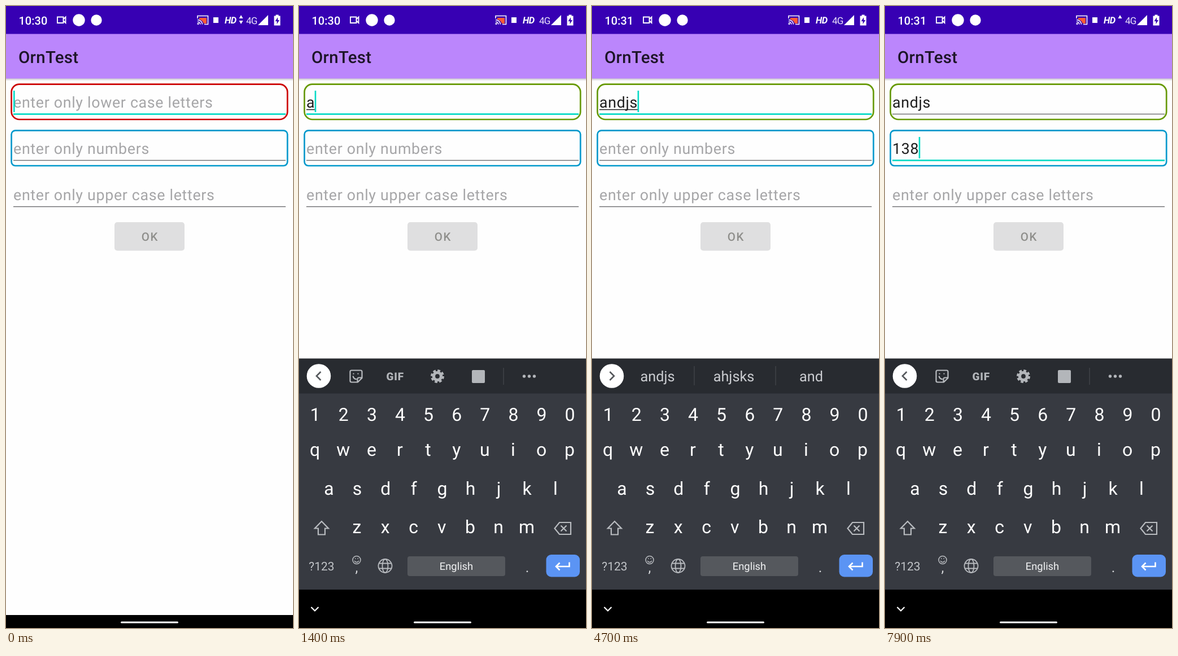
An HTML page that plays this animation: 508x1102 px, repeating every 8000 ms.

```html
<!DOCTYPE html>
<html lang="en">
<head>
<meta charset="utf-8">
<style>
  html, body { margin: 0; width: 100%; height: 100%; overflow: hidden; background: #000; }
  svg { display: block; width: 100%; height: 100%; }
  text { font-family: Roboto, sans-serif; text-rendering: geometricPrecision; white-space: pre; }
  .mid { text-anchor: middle; }
  .input { font-size: 26.8px; letter-spacing: .67px; fill: #1f1f1f; }
  .hint { fill: #a6a6a8; }
  .line { fill: none; stroke-width: 2.2; }
  .grey { stroke: #b9bcc0; fill: none; stroke-width: 2.2; }
  .fill { fill: #b3b6ba; }
  .key { font-size: 32px; fill: #fff; text-anchor: middle; }
  .tip { font-size: 25.3px; fill: #cbcdd1; text-anchor: middle; }
  .rule { stroke: #43464c; stroke-width: 1.3; }
</style>
</head>
<body>
<svg viewBox="0 0 508 1102">
  <defs>
    <linearGradient id="shade" x2="0" y2="1">
      <stop stop-color="#c4c2c8"/><stop offset="1" stop-color="#fefefe"/>
    </linearGradient>
  </defs>
  <rect width="508" height="1102" fill="#fefefe"/>
  <rect y="128" width="508" height="5" fill="url(#shade)"/>
  <rect y="49" width="508" height="79.500" fill="#bb86fc"/>
  <rect width="508" height="49.500" fill="#3700b3"/>

  <!-- status bar -->
  <g fill="#fff">
    <text id="clock" x="22.500" y="32.500" font-size="20" font-weight="500"></text>
    <path d="M91 19.500h10.500v10.500h-10.500zM101.500 23.500l4-4v10.500l-4-4" fill="none" stroke="#fff" stroke-width="1.900"/>
    <circle cx="129" cy="25" r="10.700"/>
    <circle cx="160" cy="25" r="9.700"/>
    <g id="radio">
      <path d="M342 21h13v10h-5q-2-6-8-7z" fill="#ff5a36"/>
      <path d="M339 22v-4.500h18.500v15h-6.500M339 24.500q7.500.5 8.500 8M339 28q4.500.5 5 4.500" fill="none" stroke="#fff" stroke-width="1.600"/>
      <circle cx="340" cy="31.500" r="1.500"/>
      <rect x="367" y="20" width="9" height="10"/>
      <text x="387" y="31" font-size="16.500" font-weight="700" font-style="italic" letter-spacing="-.6">HD</text>
    </g>
    <path id="up" d="M412.500 22l3.500-6 3.500 6z"/>
    <path id="down" d="M412.500 26l3.500 6 3.500-6z"/>
    <text x="425" y="31.500" font-size="17" letter-spacing="-.8" fill="#e9e0fa">4G</text>
    <path d="M464 16v18h-18z"/>
    <path d="M477.500 15.500h5v2h3v17h-11v-17h3z"/>
    <path d="M481 20l-4.500 7h3v5l4.500-7h-3z" fill="#3700b3"/>
  </g>
  <text x="22" y="100.500" font-size="29.500" font-weight="500" letter-spacing=".25" fill="#1d1528">OrnTest</text>

  <!-- form -->
  <g id="form"></g>
  <rect x="192" y="383" width="124" height="50.500" rx="5" fill="#dfdfe0"/>
  <text class="mid" x="255" y="416" font-size="20.500" font-weight="500" letter-spacing="1.800" fill="#8f8f8c">OK</text>
  <rect y="1079" width="508" height="23" fill="#000"/>

  <!-- keyboard -->
  <g id="board">
    <rect y="624.500" width="508" height="63" fill="#282b30"/>
    <rect y="686.500" width="508" height="348" fill="#373a41"/>
    <rect y="1034" width="508" height="180" fill="#000"/>
    <circle cx="35" cy="655.500" r="21.300" fill="#fff"/>
    <path id="arrow" fill="none" stroke="#55585c" stroke-width="2.600"/>
    <g id="tools">
      <path class="grey" d="M93 645.500h16q2.500 0 2.500 2.500v11l-7.500 7.500h-11q-2.500 0-2.500-2.500v-16q0-2.500 2.500-2.500zM111 658.500h-5q-2.500 0-2.500 2.500v5M95.500 655.500q1.500 6 6.500 5.500"/>
      <path class="grey" d="M95.500 651.500h2M103.500 651.500h2"/>
      <text class="fill" x="154.500" y="662.500" font-size="19" font-weight="900" letter-spacing=".8">GIF</text>
      <g fill="none" stroke="#b3b6ba" transform="translate(245 656)">
        <circle r="6.600" stroke-width="5.400"/>
        <circle r="10" stroke-width="4" stroke-dasharray="4.600 3.254"/>
      </g>
      <rect class="fill" x="306" y="645" width="23" height="23" rx="2"/>
      <path class="rule" d="M362 641v30"/>
      <g class="fill"><circle cx="398.500" cy="656" r="2.700"/><circle cx="407.500" cy="656" r="2.700"/><circle cx="416.500" cy="656" r="2.700"/></g>
    </g>
    <g id="tips"><path class="rule" d="M181 638v34M325 638v34"/></g>
    <g id="keys"></g>
    <path class="grey" d="M40 913l12 12.500h-6v11h-12v-11h-6z"/>
    <path class="grey" d="M461 915h20v21h-20l-8.500-10.500zM463.500 920.500l10 10M473.500 920.500l-10 10"/>
    <text class="mid" x="40" y="999.500" font-size="21" fill="#c1c4c8">?123</text>
    <g class="grey" style="stroke-width:1.500">
      <circle cx="102" cy="981.500" r="7"/>
      <path d="M98 983q4 5 8 0M99 979h1.500M103.500 979h1.500"/>
    </g>
    <text class="mid" x="102" y="1003" font-size="25" fill="#d5d7da">,</text>
    <g class="grey" style="stroke-width:1.800">
      <circle cx="152.500" cy="992" r="12"/><ellipse cx="152.500" cy="992" rx="5" ry="12"/>
      <path d="M142 987.500h21M142 996.500h21"/>
    </g>
    <rect x="192" y="975" width="173" height="35" rx="4" fill="#55585d"/>
    <text class="mid" x="278.500" y="999" font-size="18.400" fill="#f2f3f4">English</text>
    <text class="mid" x="404" y="1003" font-size="25" fill="#d5d7da">.</text>
    <rect x="437.500" y="972" width="59.500" height="39.500" rx="9" fill="#5b94f4"/>
    <path class="line" d="M478.500 985.500v7.500h-23M461.500 986.500l-6.500 6.500 6.500 6.500" stroke="#fff" style="stroke-width:2.600"/>
    <path class="line" d="M21.500 1065l6.500 6.500 6.500-6.500" stroke="#fff"/>
  </g>
  <path d="M204.500 1092h99" stroke="#fff" stroke-width="3" stroke-linecap="round"/>
</svg>
<script>
const LOOP = 8000, STEP = 100, LEFT = 13;
const $ = id => document.getElementById(id);

function add(parent, tag, attrs, text = '') {
  const el = document.createElementNS('http://www.w3.org/2000/svg', tag);
  for (const k in attrs) el.setAttribute(k, attrs[k]);
  el.textContent = text;
  return parent.appendChild(el);
}
const show = (el, on) => el.setAttribute('visibility', on ? 'inherit' : 'hidden');
// Latest entry whose start time has passed
const at = (list, t) => list.filter(e => e[0] <= t).pop();

// start, first field, second field; each entry restarts the caret blink
const typing = [
  [-400, '', ''], [1300, 'a', ''], [1600, 'an', ''], [1800, 'and', ''],
  [2000, 'andj', ''], [2300, 'andjs', ''], [3300, 'andjs8', ''], [4600, 'andjs', ''],
  [5600, 'andjs', ''], [6600, 'andjs', '1'], [7000, 'andjs', '13'], [7500, 'andjs', '138']
];
const FOCUS = 5600;
const tips = [
  [0], [1500, 'a', 'and', 'I'], [1600, 'an', 'and', 'any'], [1800, 'and', 'ands', 'any'],
  [2000, 'andj', 'and', 'ands'], [2300, 'andjs', 'ahjsks', 'and'],
  [3500, 'andjs8', 'sksksk…ksksks', 'sksks…jznnz'],
  [4600, 'andjs', 'ahjsks', 'and'], [FOCUS]
];
// start, arrow up, arrow down
const traffic = [[0, 1, 1], [700, 0, 0], [2000, 1, 1], [2600, 0, 0], [4200, 1, 1], [4600, 0, 0], [5500, 1, 0]];
// start, offset, opacity
const slide = [[0, 478, 0], [100, 70, .8], [200, 1.3, .97], [300, 0, 1]];

const fields = ['lower case letters', 'numbers', 'upper case letters'].map((what, i) => {
  const y = 82 * i, form = $('form');
  const hint = add(form, 'text', { class: 'input hint', x: LEFT, y: 180 + y }, 'enter only ' + what);
  const text = add(form, 'text', { class: 'input', x: LEFT, y: 180 + y });
  const spell = add(form, 'rect', { x: LEFT, y: 182.800 + y, height: 1.5, fill: '#1f1f1f' });
  const base = add(form, 'rect', { x: LEFT, width: 482 });
  const caret = add(form, 'rect', { y: 150 + y, width: 2.6, height: 38, fill: '#03dac5' });
  const box = i < 2 && add(form, 'rect', {
    x: 9.6, y: 138.600 + y, width: 488.6, height: 62.4, rx: i ? 7 : 14,
    fill: 'none', stroke: '#0099cc', 'stroke-width': 2.7
  });
  return { y, hint, text, spell, base, caret, box };
});

function drawField(f, value, focused, caretOn, composing) {
  f.text.textContent = value;
  const width = value ? f.text.getComputedTextLength() : 0;
  show(f.hint, !value);
  f.spell.setAttribute('width', composing ? width : 0);
  f.base.setAttribute('y', (focused ? 190.2 : 190.800) + f.y);
  f.base.setAttribute('height', focused ? 2.7 : 1.4);
  f.base.setAttribute('fill', focused ? '#03dac5' : '#6c6c6e');
  f.caret.setAttribute('x', LEFT + width - (value ? .5 : 0));
  show(f.caret, focused && caretOn);
}

[['1234567890', 28.7, 735], ['qwertyuiop', 28.2, 797], ['asdfghjkl', 53, 865.5], ['zxcvbnm', 102.5, 934]]
  .forEach(([row, x, y]) => [...row].forEach((c, i) =>
    add($('keys'), 'text', { class: 'key', x: x + 50.1 * i, y }, c)));

const tipTexts = [116, 252, 383.5].map(x =>
  add($('tips'), 'text', { class: 'tip', transform: `translate(${x} 665)` }));

function drawTips(words) {
  tipTexts.forEach((el, i) => {
    el.textContent = words[i] || '';
    const long = words[i] && words[i].length > 9;   // long words are set condensed
    const x = [116, 251, long ? 383.5 : 388][i];
    el.setAttribute('transform', `translate(${x} 665) scale(${long ? .7 : 1} 1)`);
  });
  const open = words.length > 0;
  show($('tips'), open);
  show($('tools'), !open);
  $('arrow').setAttribute('d', open ? 'M31.500 648l7.500 7.500-7.500 7.500' : 'M38.500 648l-7.500 7.500 7.500 7.500');
}

function draw(t) {
  const [start, first, second] = at(typing, t);
  const caretOn = (t - start) % 1000 < 500;
  const focus = t < FOCUS ? 0 : 1;
  [first, second, ''].forEach((value, i) =>
    drawField(fields[i], value, i === focus, caretOn, i === 0 && focus === 0));
  fields[0].box.setAttribute('stroke', /^[a-z]+$/.test(first) ? '#669900' : '#cc0000');

  drawTips(at(tips, t).slice(1));

  const [, up, down] = at(traffic, t);
  show($('up'), up);
  show($('down'), down);
  $('radio').setAttribute('transform', `translate(${up ? 0 : 9} 0)`);
  $('clock').textContent = t < 3500 ? '10:30' : '10:31';

  const [, offset, opacity] = at(slide, t);
  $('board').setAttribute('transform', `translate(0 ${offset})`);
  $('board').setAttribute('opacity', opacity);
}

function tick() {
  draw(Math.floor(performance.now() % LOOP / STEP) * STEP);
  requestAnimationFrame(tick);
}
tick();
</script>
</body>
</html>
```
